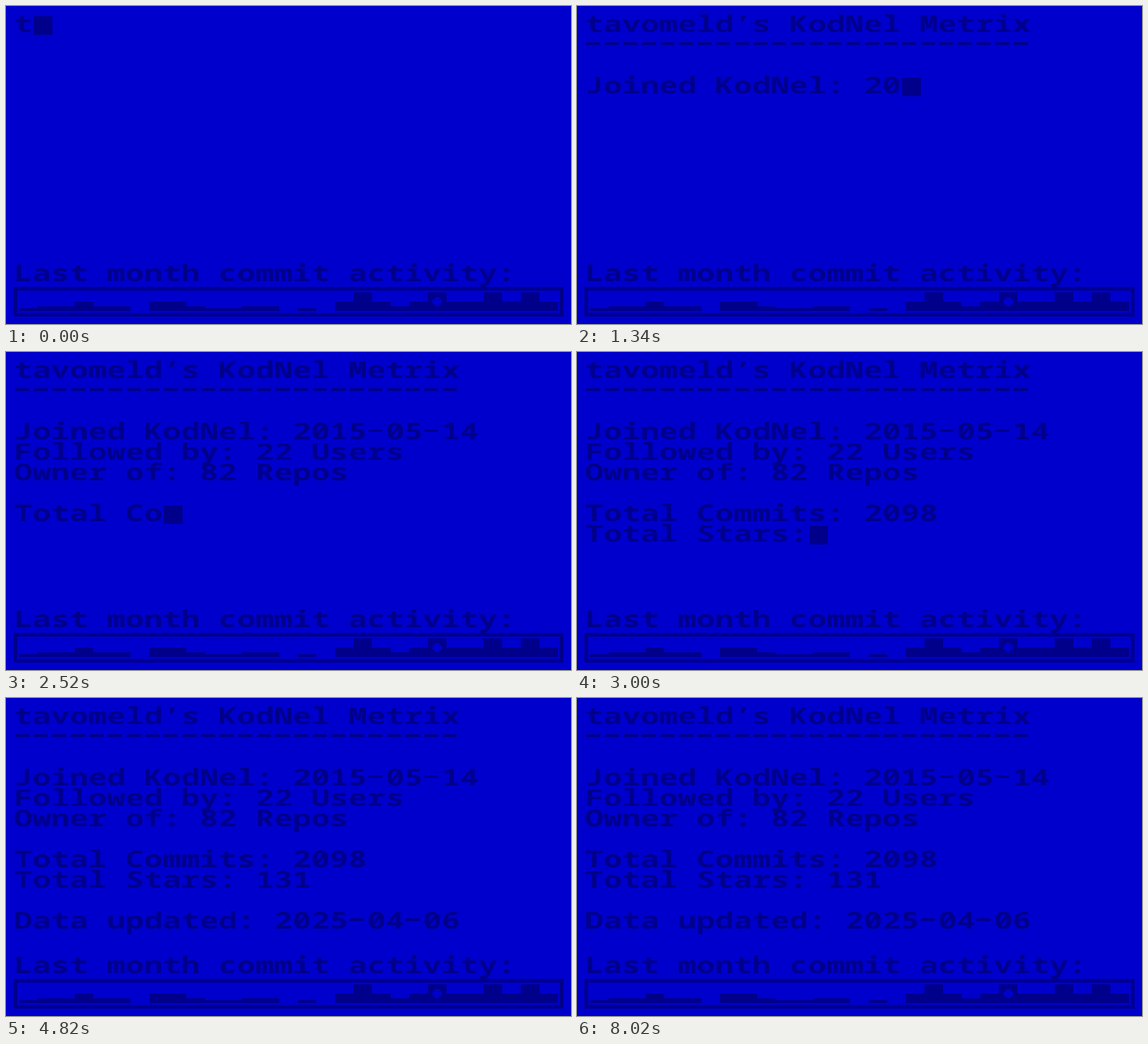
An HTML page that plays this animation: 608 by 342 pixels, repeating every 8.42 s.

```html
<!DOCTYPE html>
<html lang="en">
<head>
<meta charset="utf-8">
<title>Commit metrics terminal</title>
<style>
  html, body { margin: 0; width: 100%; height: 100%; overflow: hidden; background: #0000cd; }
  svg { display: block; width: 608px; height: 342px; fill: #00008b; }
  text {
    font: 700 25px "Noto Sans Mono", "Liberation Mono", monospace;
    text-rendering: geometricPrecision;
    white-space: pre;
  }
</style>
</head>
<body>
<svg viewBox="0 0 608 342">
  <!-- double-wide terminal type: 15px advance becomes a 20px cell -->
  <g id="lines" transform="translate(8.6 0) scale(1.33333 1)"></g>
  <path id="dashes"/>
  <rect id="cursor" width="20" height="20"/>
  <rect x="10" y="304" width="588" height="28" fill="none" stroke="#00008b" stroke-width="4"/>
  <path id="bars"/>
  <path d="M461.5 313h5v10h-5zM459 315.5h10v5h-10z" fill="#0000cd"/>
</svg>
<script>
const CELL = 20, LEFT = 10, TOP = 10, ROW = 22;
const STEP = 20, BLINK = 400, LOOP = 8420;

const script = [
  "tavomeld’s KodNel Metrix",
  "-".repeat(24),
  "",
  "Joined KodNel: 2015-05-14",
  "Followed by: 22 Users",
  "Owner of: 82 Repos",
  "",
  "Total Commits: 2098",
  "Total Stars: 131",
  "",
  "Data updated: 2025-04-06"
];
const full = script.join("\n");
const typedEnd = full.length * STEP;

const byId = id => document.getElementById(id);
const lines = byId("lines"), dashes = byId("dashes"), cursor = byId("cursor");

function addLine(top) {
  const el = document.createElementNS("http://www.w3.org/2000/svg", "text");
  el.setAttribute("y", top + 17.5);
  lines.append(el);
  return el;
}

const rows = script.map((_, i) => addLine(TOP + i * ROW));
addLine(278).textContent = "Last month commit activity:";

// One digit per day, indexing the bar heights.
const heights = [0, 3, 5, 10, 20];
byId("bars").setAttribute("d", [..."12232203321122010343234334343"].map((level, i) => {
  const h = heights[level];
  return h ? `M${14 + i * CELL} 328v${-h}h${CELL}v${h}z` : "";
}).join(""));

// Hyphens are wide blocks in this typeface, so they are drawn over hidden glyphs.
const hideHyphens = s => s.replace(/-/g, '<tspan fill="none">-</tspan>');

let shown = 0;
function type(count) {
  if (count === shown) return;
  shown = count;
  const typed = full.slice(0, count).split("\n");
  let d = "";
  rows.forEach((el, r) => {
    const line = typed[r] || "";
    el.innerHTML = hideHyphens(line);
    [...line].forEach((c, i) => {
      if (c === "-") d += `M${LEFT + i * CELL} ${TOP + r * ROW + 7}h15v3h-15z`;
    });
  });
  dashes.setAttribute("d", d);
  const last = typed.length - 1;
  cursor.setAttribute("x", LEFT + typed[last].length * CELL);
  cursor.setAttribute("y", TOP + last * ROW + 1);
}

function draw(t) {
  type(Math.min(Math.floor(t / STEP) + 1, full.length));
  const off = t >= typedEnd && Math.floor((t - typedEnd) / BLINK) % 2 === 1;
  cursor.setAttribute("visibility", off ? "hidden" : "visible");
}

const start = performance.now();
function tick() {
  draw((performance.now() - start) % LOOP);
  requestAnimationFrame(tick);
}
tick();
</script>
</body>
</html>
```
